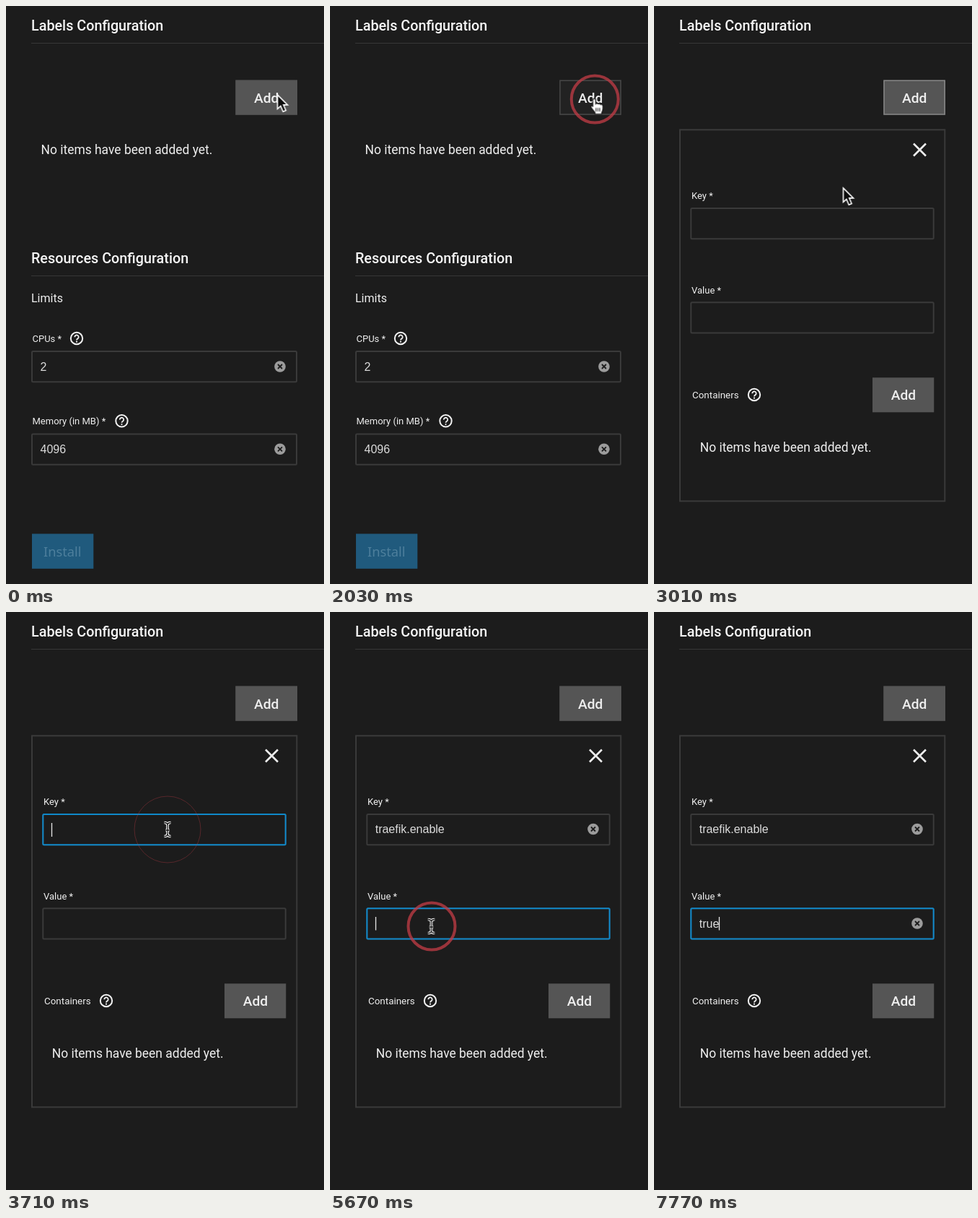
Write an HTML page that moves like this. It is 441 by 800 pixels and loops after 8000 ms.

```html
<!DOCTYPE html>
<html lang="en">
<head>
<meta charset="utf-8">
<title>Labels form</title>
<style>
  html, body { margin: 0; width: 100%; height: 100%; overflow: hidden; background: #1c1c1c; }
  svg { display: block; width: 100vw; height: 100vh; }
  text { font-family: Roboto, Inter, sans-serif; font-size: 13px; fill: #efefef; white-space: pre; }
  .title { font-size: 19.75px; font-weight: 500; fill: #f6f6f6; }
  .body { font-size: 17.45px; }
  .btn { font-size: 19.2px; font-weight: 500; }
  .input { font: 16px "Liberation Sans", Arial, sans-serif; fill: #dcdcdc; }
  .field { fill: none; stroke: #3a3a3a; stroke-width: 2; }
  .focus { fill: none; stroke: #0f88c9; stroke-width: 2; }
  .caret { stroke: #e6e6e6; stroke-width: 1.3; }
  .rule { stroke: #373737; }

  /* one shared 8 s clock; every state change is a hard step */
  .k { animation: 8s step-end -12ms infinite; }
  .home { animation-name: home; }
  .panel { animation-name: panel; }
  .top { animation-name: top; }
  .paste { animation-name: paste; }
  .spell { animation-name: spell; }
  .keyfocus { animation-name: keyfocus; }
  .keycaret { animation-name: keycaret; }
  .valfocus { animation-name: valfocus; }
  .valcaret { animation-name: valcaret; }
  .c1 { animation-name: c1; }
  .c2 { animation-name: c2; }
  .c3 { animation-name: c3; }
  .c4 { animation-name: c4; }
  .arrow { animation-name: arrow; }
  .hand { animation-name: hand; }
  .ibeam { animation-name: ibeam; }
  .pointer { animation-name: pointer; }
  .ring { fill: none; stroke: #c43c46; animation: ring 8s step-end calc(var(--at) - 8012ms) infinite; }

  @keyframes home { 0% { visibility: visible } 27.125%, 100% { visibility: hidden } }
  @keyframes panel { 0% { visibility: hidden } 27.125%, 100% { visibility: visible } }
  @keyframes top {
    0%, 100% { fill: #555; stroke: #555 }
    22.75% { fill: #222; stroke: #464646 }
    34.125% { fill: #555; stroke: #858585 }
    43.75% { fill: #555; stroke: #555 }
  }
  @keyframes paste { 0% { visibility: hidden } 51.625%, 100% { visibility: visible } }
  @keyframes spell { 0%, 70%, 100% { visibility: hidden } 54.25% { visibility: visible } }
  @keyframes keyfocus { 0%, 70%, 100% { visibility: hidden } 43.75% { visibility: visible } }
  @keyframes keycaret {
    0%, 100% { visibility: hidden; transform: none }
    43.75% { visibility: visible; transform: none }
    49.875% { visibility: hidden; transform: none }
    51.625% { visibility: visible; transform: translateX(96px) }
    56% { visibility: hidden; transform: none }
  }
  @keyframes valfocus { 0% { visibility: hidden } 70%, 100% { visibility: visible } }
  @keyframes valcaret {
    0% { visibility: hidden; transform: none }
    70%, 82.25% { visibility: visible; transform: none }
    77.875% { visibility: hidden; transform: none }
    88.375% { visibility: visible; transform: translateX(4.5px) }
    91% { visibility: visible; transform: translateX(9.5px) }
    94.5% { visibility: visible; transform: translateX(18.5px) }
    97.125%, 100% { visibility: visible; transform: translateX(27px) }
  }
  @keyframes c1 { 0% { visibility: hidden } 88.375%, 100% { visibility: visible } }
  @keyframes c2 { 0% { visibility: hidden } 91%, 100% { visibility: visible } }
  @keyframes c3 { 0% { visibility: hidden } 94.5%, 100% { visibility: visible } }
  @keyframes c4 { 0% { visibility: hidden } 97.125%, 100% { visibility: visible } }

  @keyframes arrow {
    0%, 34.125%, 60.375% { visibility: visible }
    22.75%, 40.25%, 65.625%, 100% { visibility: hidden }
  }
  @keyframes hand { 0%, 34.125%, 100% { visibility: hidden } 22.75% { visibility: visible } }
  @keyframes ibeam {
    0%, 51.625%, 88.375%, 100% { visibility: hidden }
    40.25%, 65.625% { visibility: visible }
  }
  @keyframes pointer {
    0%, 4.375% { transform: translate(376.5px, 123px); animation-timing-function: steps(5) }
    8.75%, 31.5% { transform: translate(366.5px, 126.5px); animation-timing-function: steps(2) }
    33.25% { transform: translate(352px, 144px); animation-timing-function: steps(5) }
    37.625% { transform: translate(262.5px, 252px); animation-timing-function: steps(5) }
    42%, 59.5% { transform: translate(224px, 301px); animation-timing-function: steps(1) }
    60.375% { transform: translate(207.5px, 334.5px); animation-timing-function: steps(8) }
    67.375%, 100% { transform: translate(140.5px, 435px) }
  }
  @keyframes ring {
    0% { r: 14px; stroke-width: 6px; opacity: .75 }
    .875% { r: 25px; stroke-width: 5.2px; opacity: .75 }
    1.75% { r: 32.5px; stroke-width: 4px; opacity: .75 }
    2.625% { r: 41px; stroke-width: 1.5px; opacity: .75 }
    3.5% { r: 46px; stroke-width: 1px; opacity: .35 }
    4.375%, 100% { r: 46px; stroke-width: 1px; opacity: 0 }
  }
</style>
</head>
<body>
<svg viewBox="0 0 441 800" preserveAspectRatio="none">
  <defs>
    <g id="help">
      <circle r="8.2" fill="none" stroke="#f2f2f2" stroke-width="2"/>
      <path d="M-2.7-1.7A2.7 2.7 0 1 1 1.5.4Q0 1.2 0 2.5" fill="none" stroke="#f2f2f2" stroke-width="1.8"/>
      <circle cy="4.7" r="1.1" fill="#f2f2f2"/>
    </g>
    <g id="clear">
      <circle r="7.8" fill="#9c9c9c"/>
      <path d="M-3-3 3 3M3-3-3 3" stroke="#1c1c1c" stroke-width="1.8"/>
    </g>
  </defs>

  <text class="title" x="35" y="34">Labels Configuration</text>
  <path class="rule" d="M35 51.5H441"/>
  <rect class="k top" x="319" y="103.2" width="84.2" height="46.8" stroke-width="1.6"/>
  <text class="btn" x="344" y="133.5">Add</text>

  <g class="k home">
    <text class="body" x="48.5" y="204.5">No items have been added yet.</text>
    <text class="title" x="35" y="356">Resources Configuration</text>
    <path class="rule" d="M35 373.5H441"/>
    <text x="35" y="409.5" style="font-size:16px">Limits</text>
    <text x="36.5" y="464.5">CPUs *</text>
    <use href="#help" x="98" y="460"/>
    <rect class="field" x="36" y="478" width="367" height="42.3" rx="1.5"/>
    <text class="input" x="47.5" y="504.7">2</text>
    <use href="#clear" x="380" y="499"/>
    <text x="36.5" y="579">Memory (in MB) *</text>
    <use href="#help" x="160.5" y="574.3"/>
    <rect class="field" x="36" y="592.5" width="367" height="42.3" rx="1.5"/>
    <text class="input" x="47.5" y="619.2">4096</text>
    <use href="#clear" x="380" y="613.3"/>
    <rect x="36" y="730.5" width="85.3" height="48.3" fill="#205a7d"/>
    <text x="52" y="761.5" style="font:500 18.3px 'Noto Sans',sans-serif;fill:#4d7f9c">Install</text>
  </g>

  <g class="k panel">
    <rect class="field" x="36" y="171.3" width="367.3" height="514"/>
    <path d="M360 190.5 377 207.5M377 190.5 360 207.5" stroke="#ececec" stroke-width="2.6"/>
    <text x="52" y="267">Key *</text>
    <rect class="field" x="51.3" y="280" width="336.4" height="42.2" rx="1.5"/>
    <text x="52" y="397.5">Value *</text>
    <rect class="field" x="51.3" y="410.3" width="336.4" height="42.2" rx="1.5"/>
    <text x="53" y="543" style="font-size:13.4px">Containers</text>
    <use href="#help" x="139" y="538"/>
    <rect x="303" y="514.3" width="85.3" height="48" fill="#555"/>
    <text class="btn" x="328.7" y="545.3">Add</text>
    <text class="body" x="63.7" y="616.5">No items have been added yet.</text>
  </g>

  <rect class="k focus keyfocus" x="51.3" y="280" width="336.4" height="42.2" rx="1.5"/>
  <text class="k input paste" x="62.7" y="306">traefik.enable</text>
  <use class="k paste" href="#clear" x="365" y="300.5"/>
  <path class="k spell" d="M64 309H158.5" stroke="#d23a36" stroke-width="2" stroke-linecap="round" stroke-dasharray=".1 3.7"/>
  <path class="k caret keycaret" d="M63.5 292V311"/>

  <rect class="k focus valfocus" x="51.3" y="410.3" width="336.4" height="42.2" rx="1.5"/>
  <text class="input" x="62.7" y="436.7"><tspan class="k c1">t</tspan><tspan class="k c2">r</tspan><tspan class="k c3">u</tspan><tspan class="k c4">e</tspan></text>
  <use class="k c1" href="#clear" x="365" y="431"/>
  <path class="k caret valcaret" d="M63.5 422V440.5"/>

  <circle class="ring" cx="367.3" cy="129" r="46" style="--at:1050ms"/>
  <circle class="ring" cx="367.3" cy="129" r="46" style="--at:1890ms"/>
  <circle class="ring" cx="224" cy="301" r="46" style="--at:3430ms"/>
  <circle class="ring" cx="141" cy="435" r="46" style="--at:5530ms"/>

  <g class="k pointer">
    <path class="k arrow" d="M0 0V19.5L4.4 15.4 7.8 23.2 11.6 21.6 8.3 13.9H14Z" fill="#0c0c0c" stroke="#fff" stroke-width="1.6"/>
    <g class="k hand">
      <path d="M-2 13V4Q-2 1.6 0 1.6T2 4V9Q3.6 7.4 5.4 9 7.4 8 8.7 9.8 11.8 9.2 12 12V16Q11.4 19 10.3 21V23H1V21Q-2 17.4-4.3 14.2-5.4 11.8-3.7 11.4-2.7 11.4-2 13Z" fill="#fff" stroke="#111" stroke-width="1.2"/>
      <path d="M2.4 14.5V19.5M5 14.5V19.5M7.6 14.5V19.5" stroke="#222" stroke-width="1.1"/>
    </g>
    <g class="k ibeam" fill="none">
      <path id="beam" d="M-4.5-9.5Q0-9.5 0-6 0-9.5 4.5-9.5M0-6V6M-4.5 9.5Q0 9.5 0 6 0 9.5 4.5 9.5M-2.5 1H2.5" stroke="#fff" stroke-width="3.6"/>
      <path d="M-4.5-9.5Q0-9.5 0-6 0-9.5 4.5-9.5M0-6V6M-4.5 9.5Q0 9.5 0 6 0 9.5 4.5 9.5M-2.5 1H2.5" stroke="#111" stroke-width="1.3"/>
    </g>
  </g>
</svg>
</body>
</html>
```
